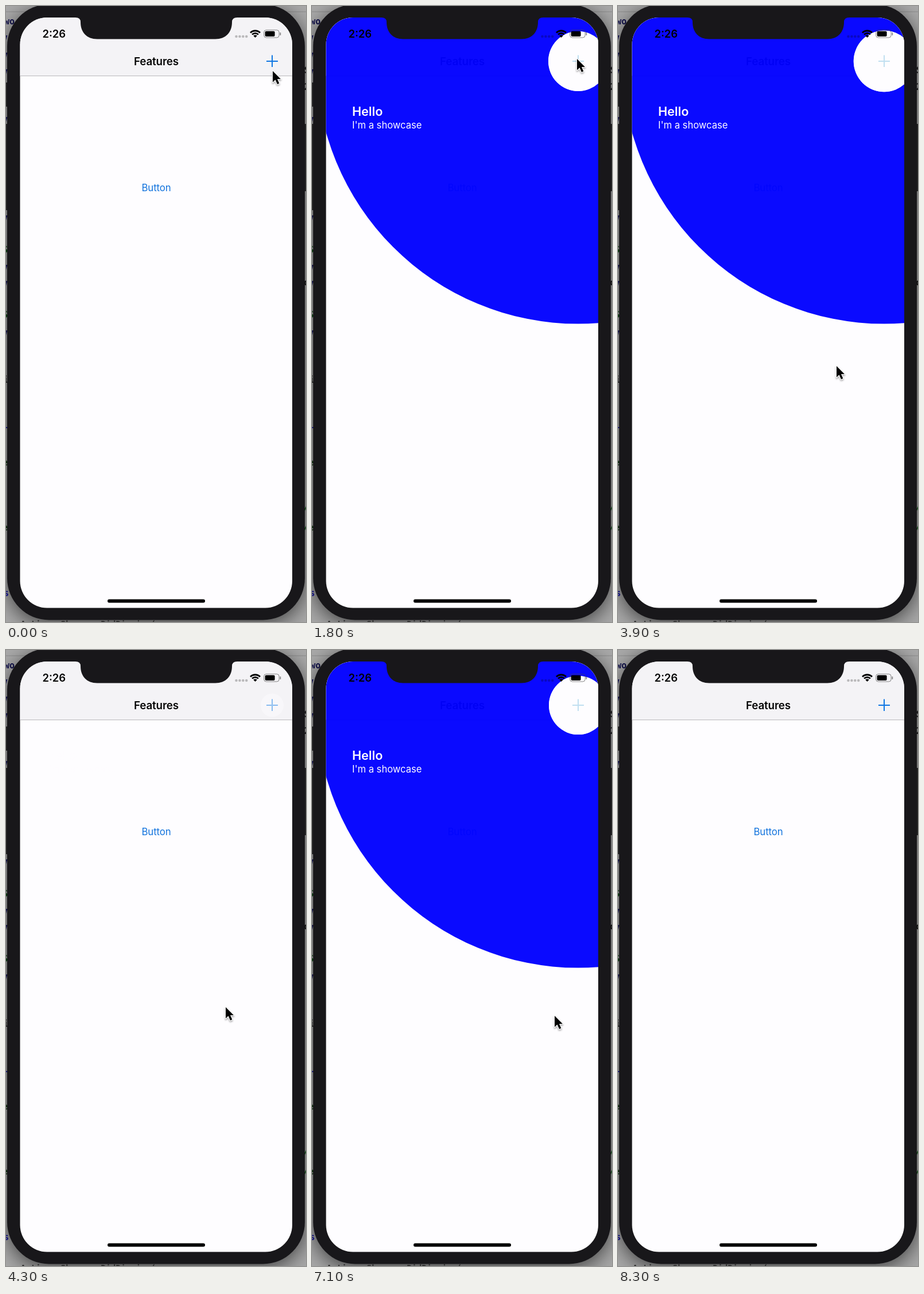
Write an HTML page with a canvas that moves like this. It is 523 by 1071 pixels and loops after 8400 ms.

```html
<!DOCTYPE html>
<html lang="en">
<head>
<meta charset="utf-8">
<title>Feature showcase</title>
<style>
  html, body { margin: 0; width: 100%; height: 100%; overflow: hidden; background: #a5a5a5; }
  canvas { display: block; width: 523px; height: 1071px; }
</style>
</head>
<body>
<canvas id="stage" width="523" height="1071"></canvas>
<script>
const W = 523, H = 1071, LOOP = 8400, STEP = 100;
const ctx = document.getElementById('stage').getContext('2d');
const SANS = 'Inter, "Noto Sans", sans-serif';
const MONO = '"DejaVu Sans Mono", monospace';
const PLUS = { x: 464, y: 96 };
const HOLDER_R = 50.4, DISC_R = 456.6;
const IN_MS = 500, OUT_MS = 500, PULSE_MS = 1000;
const SHOWS = [{ open: 1050, close: 3920 }, { open: 5450, close: 7450 }];
// time, x, y of the pointer tip
const PATH = [
  [0, 465, 113], [700, 462, 92], [2100, 462, 92], [3100, 381, 626], [3900, 381, 626],
  [4300, 383, 621], [4500, 383, 621], [5300, 467, 102], [6000, 467, 102],
  [6800, 423, 636], [7600, 423, 636], [8100, 223, 520], [8200, 2, 322], [8300, -60, 260]
];

const clamp = v => Math.max(0, Math.min(1, v));
const ease = v => { v = clamp(v); return v * v * (3 - 2 * v); };
const mix = (a, b, p) => a + (b - a) * p;

function disc(x, y, r, fill) {
  ctx.fillStyle = fill;
  ctx.beginPath();
  ctx.arc(x, y, r, 0, 7);
  ctx.fill();
}

function box(x, y, w, h, r, fill) {
  ctx.fillStyle = fill;
  ctx.beginPath();
  ctx.roundRect(x, y, w, h, r);
  ctx.fill();
}

function text(str, x, y, font, fill, spacing = 0, align = 'left') {
  ctx.font = font;
  ctx.fillStyle = fill;
  ctx.textAlign = align;
  ctx.letterSpacing = spacing + 'px';
  ctx.fillText(str, x, y);
}

function plus(color) {
  ctx.fillStyle = color;
  ctx.fillRect(PLUS.x - 10, PLUS.y - 1, 20, 2);
  ctx.fillRect(PLUS.x - 1, PLUS.y - 10.5, 2, 20.5);
}

function desktop() {
  ctx.fillStyle = '#a9a9a9';
  ctx.fillRect(0, 0, W, H);
  ctx.fillStyle = '#8c8c8c';
  ctx.fillRect(0, 9.5, W, 1);
  const bold = `bold 15px ${MONO}`;
  text('wo', -3, 32, bold, '#14144e');
  for (const y of [60, 90, 119, 202, 287, 373, 459, 487, 573]) text('v', -6, y, bold, '#1a1a5c');
  for (const y of [429, 542]) text('S', -6, y, bold, '#0c4a12');
  text('i', -5, 655, bold, '#222');
  text('r', -6, 741, bold, '#1414a0');
  text('s', -4, 1026, bold, '#1414a0');
  for (const y of [799, 912]) text('e', -6, y, bold, '#183c18');
  ctx.fillStyle = '#2e2e2e';
  ctx.fillRect(0, 133, 8, 42);
  ctx.fillRect(0, 205, 8, 150);
  ctx.fillRect(518, 205, 5, 117);
  text('S', 520, 117, bold, '#222');
  text('2', 520, 146, bold, '#222');
  text('c', 519, 486, bold, '#111');
  text('/', 518, 878, bold, '#0c5a12');
  text('/', 518, 912, bold, '#0c5a12');
}

function phone() {
  ctx.save();
  ctx.shadowColor = 'rgba(0,0,0,.6)';
  ctx.shadowBlur = 34;
  ctx.shadowOffsetY = 8;
  box(2, -3, 519, 1070.5, 73, '#18171a');
  ctx.restore();
  text('a Action: ShowcaseDidDismiss(', 8, 1079, `bold 14.5px ${MONO}`, '#303030');
}

function screenPath() {
  ctx.beginPath();
  ctx.roundRect(24.5, 20, 474.5, 1026.5, 47);
}

function page() {
  ctx.fillStyle = '#fefdff';
  ctx.fillRect(24, 20, 476, 1028);
  ctx.fillStyle = '#f4f3f6';
  ctx.fillRect(24, 20, 476, 101);
  ctx.fillStyle = '#bab9bc';
  ctx.fillRect(24, 121, 476, 1);
  text('Features', 262, 102.5, `600 18.8px ${SANS}`, '#050505', -0.15, 'center');
  text('Button', 262, 322, `400 16.8px ${SANS}`, '#1273dd', -0.1, 'center');
  plus('#0f76e3');
}

function pulse(ms) {
  const p = ease((ms % PULSE_MS) / PULSE_MS);
  if (p < 0.5) return { scale: 1 + 0.2 * p, ripple: 1, glow: 0 };
  const q = p * 2 - 1;
  return { scale: 1.1 - 0.1 * q, ripple: 1.1 + 0.5 * q, glow: 0.5 * (1 - q) };
}

function showcase(t) {
  const show = SHOWS.find(s => t >= s.open && t < s.close + OUT_MS);
  if (!show) return;
  const come = ease((t - show.open) / IN_MS);
  const go = ease((t - show.close) / OUT_MS);
  const leave = clamp(go / 0.6);
  const alpha = go > 0 ? 1 - clamp((go - 0.6) / 0.4) : come;
  let beat = { scale: 1, ripple: 1, glow: 0 };
  if (go > 0) beat.scale = mix(1, 0.4, leave);
  else if (t > show.open + IN_MS) beat = pulse(t - show.open - IN_MS);

  const discR = go > 0 ? DISC_R * mix(1, 1.3, leave) : mix(HOLDER_R, DISC_R, come);
  ctx.save();
  // The fading group is opaque inside the holder, so the blue must not show through it.
  const holderR = HOLDER_R * beat.scale;
  ctx.save();
  ctx.beginPath();
  ctx.rect(0, 0, W, H);
  ctx.arc(PLUS.x, PLUS.y, holderR, 0, 7);
  ctx.clip('evenodd');
  ctx.globalAlpha = alpha * 0.96 * (1 - leave);
  disc(PLUS.x, PLUS.y, discR, '#00f');
  ctx.globalAlpha = alpha * beat.glow;
  disc(PLUS.x, PLUS.y, HOLDER_R * beat.ripple, '#fff');
  ctx.restore();

  ctx.globalAlpha = alpha;
  disc(PLUS.x, PLUS.y, holderR, '#fefdff');
  plus('#c0dff0');
  text('Hello', 70, 191, `600 21.6px ${SANS}`, '#fefdff');
  text("I'm a showcase", 70, 213, `400 16.6px ${SANS}`, '#fefdff');
  ctx.restore();
}

function wifi(x, y) {
  ctx.fillStyle = '#000';
  for (const [inner, outer] of [[0, 4.6], [6.2, 9], [10.6, 13.4]]) {
    ctx.beginPath();
    ctx.arc(x, y, outer, -Math.PI * 0.75, -Math.PI * 0.25);
    ctx.arc(x, y, inner, -Math.PI * 0.25, -Math.PI * 0.75, true);
    ctx.fill();
  }
}

function statusBar() {
  text('2:26', 63.5, 55, `600 18.4px ${SANS}`, '#000');
  for (let i = 0; i < 4; i++) disc(401.5 + i * 5.9, 53, 2.3, 'rgba(0,0,0,.24)');
  wifi(434.5, 55);
  ctx.strokeStyle = 'rgba(70,70,70,.65)';
  ctx.lineWidth = 1;
  ctx.beginPath();
  ctx.roundRect(449.7, 41.8, 26.4, 13.2, 4);
  ctx.stroke();
  box(451.6, 43.7, 17, 9.4, 2, '#000');
  box(477.5, 46, 1.7, 5, 1, 'rgba(70,70,70,.65)');
}

function notch() {
  ctx.fillStyle = '#18171a';
  ctx.beginPath();
  ctx.moveTo(121, 19);
  ctx.lineTo(121, 20);
  ctx.quadraticCurveTo(130, 20, 130, 28);
  ctx.bezierCurveTo(130, 46, 141, 57.5, 159, 57.5);
  ctx.lineTo(365, 57.5);
  ctx.bezierCurveTo(383, 57.5, 394, 46, 394, 28);
  ctx.quadraticCurveTo(394, 20, 403, 20);
  ctx.lineTo(403, 19);
  ctx.fill();
}

function pointer(t) {
  const next = PATH.findIndex(p => p[0] > t);
  if (next < 1) return;
  const [t0, x0, y0] = PATH[next - 1], [t1, x1, y1] = PATH[next];
  const p = ease((t - t0) / (t1 - t0));
  ctx.save();
  ctx.translate(mix(x0, x1, p), mix(y0, y1, p));
  const shape = new Path2D('M0 0V19.5L4.6 15.2L8 23L11.3 21.6L8 13.9H14Z');
  ctx.shadowColor = 'rgba(0,0,0,.35)';
  ctx.shadowBlur = 3;
  ctx.shadowOffsetY = 2;
  ctx.lineWidth = 2.4;
  ctx.lineJoin = 'round';
  ctx.strokeStyle = '#fff';
  ctx.stroke(shape);
  ctx.shadowColor = 'transparent';
  ctx.fillStyle = '#000';
  ctx.fill(shape);
  ctx.restore();
}

function draw(t) {
  ctx.clearRect(0, 0, W, H);
  desktop();
  phone();
  ctx.save();
  screenPath();
  ctx.clip();
  page();
  showcase(t);
  statusBar();
  box(177, 1031.5, 170, 6, 3, '#000');
  ctx.restore();
  notch();
  pointer(t);
}

const start = performance.now();
function tick() {
  const t = (performance.now() - start) % LOOP;
  draw(Math.floor(t / STEP) * STEP);
  requestAnimationFrame(tick);
}
tick();
</script>
</body>
</html>
```
